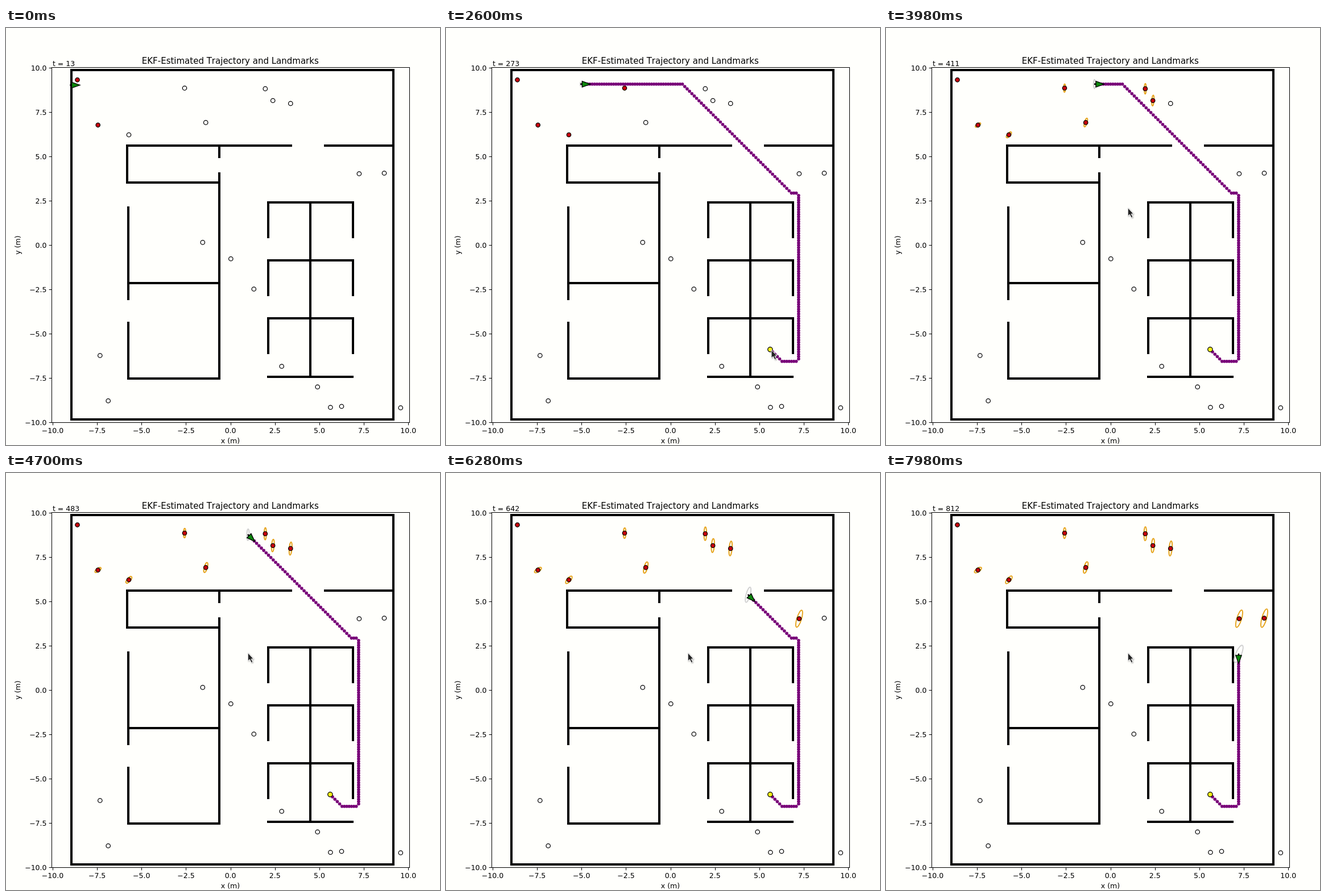
Write an HTML page that moves like this. It is 763 px wide and 734 px high and loops after 8 s.

```html
<!DOCTYPE html>
<html lang="en">
<head>
<meta charset="utf-8">
<title>Trajectory and landmarks</title>
<style>
  html, body { margin: 0; width: 100%; height: 100%; overflow: hidden; background: #fffffc; }
  svg { display: block; width: 100%; height: 100%; }
  text { font: 12.5px "DejaVu Sans", sans-serif; font-kerning: none; fill: #000; }
  .title { font-size: 15px; }
  .mid { text-anchor: middle; }
  .end { text-anchor: end; }
  .axes { fill: none; stroke: #000; stroke-width: 1; }
  .walls { fill: none; stroke: #000; stroke-width: 4; }
  .mark { fill: #fff; stroke: #000; stroke-width: 1.25; }
  .mark.seen { fill: #c8000c; }
  .spread { fill: none; stroke: #e6a41c; stroke-width: 1.9; }
  .pose { stroke: #d0d0d0; }
  .robot { fill: #0c860c; stroke: #000; stroke-width: 1.3; }
  .route { fill: #780078; }
  .goal { fill: #f6f018; stroke: #000; stroke-width: 1.3; }
  .cursor { fill: #222; stroke: #fff; stroke-width: 1; filter: drop-shadow(1px 1.5px 1px #0005); }
</style>
</head>
<body>
<svg viewBox="0 0 763 734">
  <text class="title mid" x="394.3" y="62.5">EKF-Estimated Trajectory and Landmarks</text>
  <text id="counter" x="82" y="67"></text>
  <text class="mid" x="394.5" y="731">x (m)</text>
  <text class="mid" transform="translate(24.5 382) rotate(-90)">y (m)</text>
  <g id="ticks"></g>
  <rect class="axes" x="80.5" y="69.5" width="629" height="625"/>
  <g id="walls" class="walls">
    <path d="M115 74H681V689H115Z"/>
    <path d="M503 207H213V272H375M559 207H681M375 207V229M375 254V617H215V517M215 314V479M215 449H375"/>
    <path d="M459 614H611M535 307V614"/>
  </g>
  <g id="spreads"></g>
  <g id="marks"></g>
  <g id="routes" class="route"></g>
  <circle id="goal" class="goal" r="4.2"/>
  <ellipse id="pose" class="spread pose"/>
  <path id="robot" class="robot" d="M0 -.6H2.5V-5.2L17 0L2.5 5.2V.6H0Z"/>
  <path id="cursor" class="cursor" d="M0 0V14.5L3.3 11.6L6 17.5L8.6 16.3L6 10.7H10Z"/>
</svg>
<script>
const LOOP = 8000, FRAME = 20;
const STEP = 4.17;           // planning grid, px
const RANGE = 125;           // sensor reach, px
const SPEED = 0.94;          // px per tick
const TURN = Math.PI / 20;   // radians per tick
const HOME = { x: 113, y: 100.5 };
const LANE = 98.8;

const $ = id => document.getElementById(id);
const show = (el, on) => el.setAttribute("visibility", on ? "visible" : "hidden");
const mix = (a, b, f) => a + (b - a) * f;
const distance = (a, b) => Math.hypot(a.x - b.x, a.y - b.y);

function set(el, attrs) {
  for (const key in attrs) el.setAttribute(key, attrs[key]);
  return el;
}
function add(parent, tag, attrs, text = "") {
  const el = document.createElementNS("http://www.w3.org/2000/svg", tag);
  el.textContent = text;
  return parent.appendChild(set(el, attrs));
}

for (let i = 0; i < 3; i++)
  add($("walls"), "path", { d: `M461 ${370 + 102 * i}v-63h149v63` });

for (let i = 0; i <= 8; i++) {
  const label = v => v.toFixed(1).replace("-", "\u2212");
  const x = 82 + 78.15 * i, y = 70 + 78 * i;
  add($("ticks"), "path", {
    class: "axes", d: `M${Math.round(x) + .5} 694.5v4.8M80.5 ${y + .5}h-4.8`
  });
  add($("ticks"), "text", { class: "mid", x, y: 713 }, label(-10 + 2.5 * i));
  add($("ticks"), "text", { class: "end", x: 71.5, y: y + 4.7 }, label(10 - 2.5 * i));
}

// Each run is [dx, dy, count] in grid steps.
const firstRuns = [[1, 0, 72], [1, 1, 36]];
const finalRuns = [[1, 0, 72], [1, 1, 46], [1, 0, 2], [1, 1, 1], [0, 1, 69], [-1, 1, 1], [-1, 0, 6], [-1, -1, 5]];

function buildRoute(from, to, runs) {
  const group = add($("routes"), "g", {});
  let x = 415.6 - 72 * STEP, y = LANE;
  const points = [{ x, y }];
  for (const [dx, dy, count] of runs)
    for (let i = 0; i < count; i++) points.push({ x: x += dx * STEP, y: y += dy * STEP });
  for (const p of points) p.dot = add(group, "circle", { cx: p.x, cy: p.y, r: 2.8 });
  return { from, to, points, group };
}
const routes = [buildRoute(1280, 2380, firstRuns), buildRoute(2380, LOOP, finalRuns)];

// The robot follows the runs at constant speed and turns on the spot between them.
function buildDrive() {
  let pose = { tick: 145, x: 116.5, y: LANE, angle: 0 };
  const keys = [{ tick: 141, ...HOME, angle: 0 }, pose];
  const go = change => keys.push(pose = { ...pose, ...change });
  let index = 0;
  for (const [dx, dy, count] of finalRuns) {
    const corner = routes[1].points[index += count];
    const angle = Math.atan2(dy, dx);
    go({ tick: pose.tick + Math.abs(angle - pose.angle) / TURN, angle });
    go({ tick: pose.tick + distance(pose, corner) / SPEED, x: corner.x, y: corner.y });
  }
  return keys;
}
const drive = buildDrive();

function robotAt(tick) {
  const i = drive.findIndex(key => key.tick > tick);
  if (i === 0) return drive[0];
  const a = drive[i - 1], b = drive[i], f = (tick - a.tick) / (b.tick - a.tick);
  return { x: mix(a.x, b.x, f), y: mix(a.y, b.y, f), angle: mix(a.angle, b.angle, f) };
}

// Heading error spreads positions across the bearing from home, more with distance and time.
function drawSpread(el, p, tick) {
  const far = distance(p, HOME);
  const growth = 1 / (1 + Math.exp((310 - tick) / 90));
  const bearing = Math.atan2(p.y - HOME.y, p.x - HOME.x) * 180 / Math.PI;
  set(el, {
    rx: growth * Math.min(far * .2, 2.3 + .012 * Math.abs(p.y - HOME.y)),
    ry: growth * Math.min(far * .2, 5.7 + .0193 * far),
    transform: `translate(${p.x} ${p.y}) rotate(${bearing})`
  });
}

const landmarks = [
  [125.5, 91.3], [161.7, 170.8], [216, 188], [314, 105.8], [351.2, 166.4],
  [455.8, 106.9], [469.2, 127.7], [500.3, 132.9], [620.9, 256.5], [665, 255.5],
  [345.8, 377.4], [395.3, 406.3], [435.8, 459.5], [165.3, 576.5], [179.7, 656.2],
  [484.7, 595.5], [547.7, 631.7], [570.4, 667.7], [590, 666], [693.8, 668.5]
].map(([x, y]) => {
  let seenAt = 13;
  while (seenAt < 813 && distance({ x, y }, robotAt(seenAt)) > RANGE) seenAt++;
  return {
    x, y, seenAt,
    ring: add($("spreads"), "ellipse", { class: "spread" }),
    dot: add($("marks"), "circle", { class: "mark", cx: x, cy: y, r: 3.7 })
  };
});

const moves = [
  { from: 460, to: 780, x: 565, y: 249.5, dip: 0 },
  { from: 1720, to: 2120, x: 572, y: 566.5, dip: 0 },
  { from: 3360, to: 3860, x: 425.2, y: 316.5, dip: 180 }
];

function pointerAt(t) {
  let x = 734, y = 200;
  for (const m of moves) {
    const f = Math.min(1, Math.max(0, (t - m.from) / (m.to - m.from)));
    const eased = f * f * (3 - 2 * f);
    x = mix(x, m.x, eased);
    y = mix(y, m.y, eased) + m.dip * Math.sin(Math.PI * eased);
  }
  return { x, y };
}

function render(t) {
  const tick = 13 + Math.floor(t * .1002);
  const robot = robotAt(tick);
  $("counter").textContent = "t = " + tick;
  set($("robot"), {
    transform: `translate(${robot.x} ${robot.y}) rotate(${robot.angle * 180 / Math.PI})`
  });
  drawSpread($("pose"), robot, tick);

  for (const mark of landmarks) {
    const seen = tick >= mark.seenAt;
    mark.dot.classList.toggle("seen", seen);
    show(mark.ring, seen);
    drawSpread(mark.ring, mark, tick);
  }

  const active = routes.find(r => t >= r.from && t < r.to);
  for (const route of routes) route.group.style.display = route === active ? "" : "none";
  show($("goal"), active);
  if (active) {
    const gaps = active.points.map(p => distance(p, robot));
    const nearest = gaps.indexOf(Math.min(...gaps));
    active.points.forEach((p, i) => show(p.dot, i > nearest));
    const { x, y } = active.points.at(-1);
    set($("goal"), { cx: x, cy: y });
  }

  const pointer = pointerAt(t);
  show($("cursor"), t >= moves[0].from);
  set($("cursor"), { transform: `translate(${pointer.x} ${pointer.y})` });
}

const start = performance.now();
function frame() {
  const t = (performance.now() - start) % LOOP;
  render(Math.floor(t / FRAME) * FRAME);
  requestAnimationFrame(frame);
}
frame();
</script>
</body>
</html>
```
